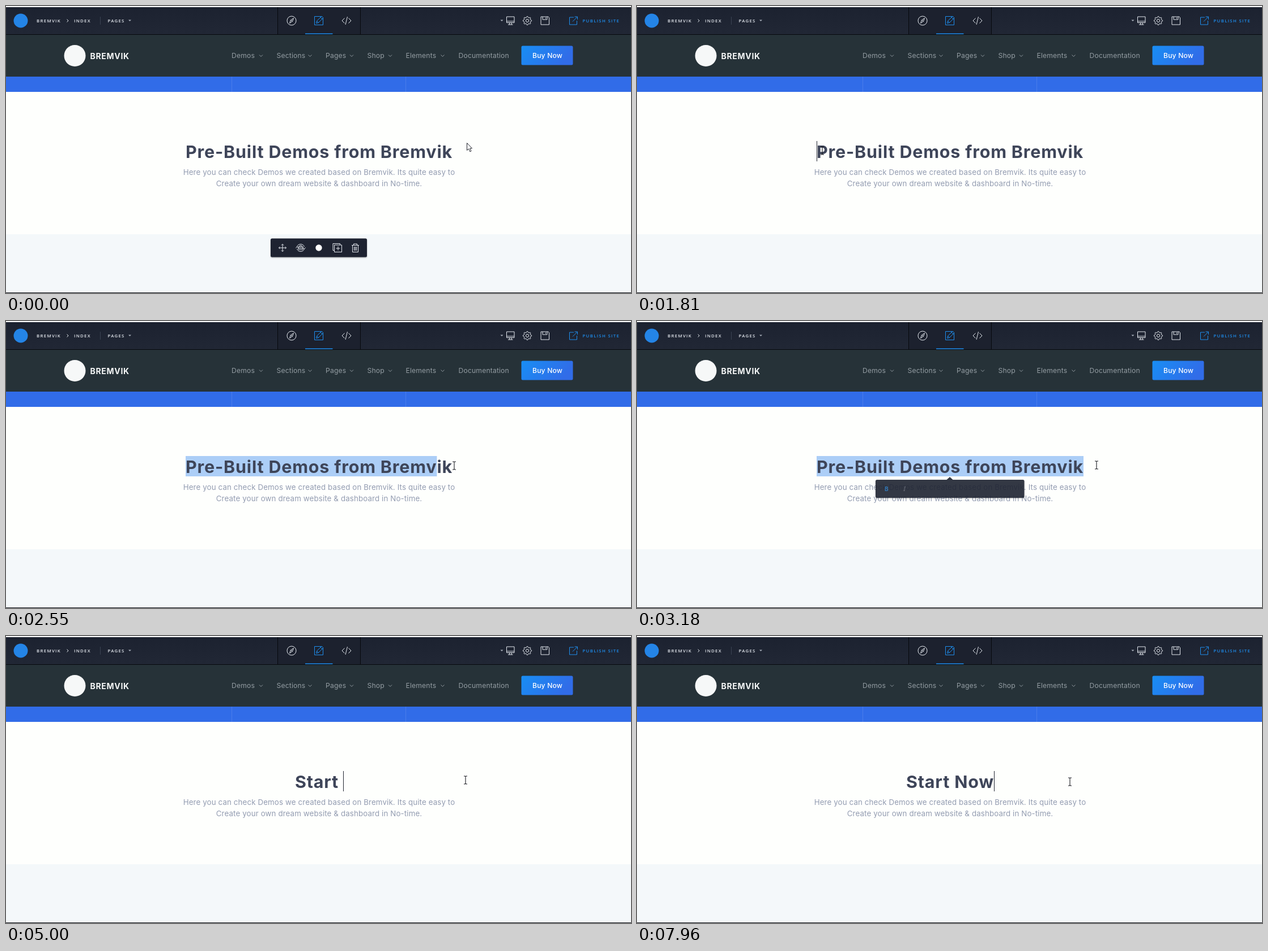
An HTML page for the animation above (8000 ms loop, 1103 by 508 pixels).

```html
<!DOCTYPE html>
<html lang="en">
<head>
<meta charset="utf-8">
<title>Site builder</title>
<style>
html, body { margin: 0; width: 100%; height: 100%; overflow: hidden; background: #fefffd; }
svg { display: block; width: 100vw; height: 100vh; }
text { font-family: Inter, "Open Sans", sans-serif; white-space: pre; }
.top text { font: 600 7.8px "Open Sans", sans-serif; letter-spacing: 1.3px; fill: #e4e8ee; }
.nav text { font-size: 12.2px; letter-spacing: .14px; fill: #939ca2; }
.copy text { font-size: 13.3px; letter-spacing: .13px; fill: #939cb1; text-anchor: middle; }
#title { font-size: 30.5px; font-weight: 700; letter-spacing: .8px; fill: #3e4559; text-anchor: middle; }
.line { fill: none; stroke: #e4e8ee; stroke-width: 1; stroke-linejoin: round; }
.blue { stroke: #1e8eee; }
.panel { fill: #1e2331; filter: drop-shadow(0 1px 1px rgba(0, 0, 0, .3)); }
</style>
</head>
<body>
<svg viewBox="0 0 1103 508" preserveAspectRatio="none">
  <defs>
    <linearGradient id="buy" x1="0" y1="0" x2="1" y2=".3">
      <stop offset="0" stop-color="#188ef4"/><stop offset="1" stop-color="#316ce8"/>
    </linearGradient>
    <linearGradient id="bar" x1="0" y1="0" x2="0" y2="1">
      <stop offset="0" stop-color="#1c2230"/><stop offset="1" stop-color="#212735"/>
    </linearGradient>
  </defs>

  <rect width="1103" height="508" fill="#fefffd"/>
  <rect y="2" width="1103" height="48" fill="url(#bar)"/>
  <rect y="50" width="1103" height="1" fill="#07090d"/>
  <rect y="51" width="1103" height="74" fill="#263238"/>
  <rect y="125" width="1103" height="27" fill="#316ce8"/>
  <path d="M398.500 125V152M705.500 125V152" stroke="#4a7deb"/>
  <rect y="404" width="1103" height="103" fill="#f4f8fa"/>
  <rect y="507" width="1103" height="1" fill="#15171c"/>

  <g class="top">
    <rect x="479" y="2" width="147" height="48" fill="#1c212e"/>
    <path d="M479.500 2V50M625.500 2V50" stroke="#07090d"/>
    <rect x="528" y="48.500" width="48.500" height="1.500" fill="#1e8eee"/>
    <circle cx="26" cy="26" r="12.500" fill="#2484e6"/>
    <text x="54" y="29">BREMVIK</text>
    <path class="line" d="M107.500 23.500l2.500 2.500-2.500 2.500"/>
    <text x="120" y="29">INDEX</text>
    <path d="M166.500 19V33" stroke="#3a4252"/>
    <text x="179.500" y="29">PAGES</text>
    <path d="M216 24.500h5l-2.500 2.500zM872.500 24.500h5l-2.500 2.500z" fill="#aab1bc"/>

    <circle class="line" cx="504" cy="26" r="8"/>
    <path class="line" d="M507.500 21.500l-2 5.500-5 3.500 2-5.500zM502.500 25l3 2"/>
    <path class="line blue" d="M557 18.500H544.500V33.500H559.500V22M547.500 30.500l1-4 8.500-8.500 3 3-8.500 8.500zM548.500 26.500l3 3M555 20l3 3"/>
    <path class="line" d="M597.500 21.500l-4.500 4.500 4.500 4.500M604.500 21.500l4.500 4.500-4.500 4.500M602.500 19l-3.500 14"/>

    <path class="line" d="M883.500 19h13.500v10.500h-13.500zM883.500 27h13.500M888.500 29.500v3.500M892 29.500v3.500M886 33h8.500"/>
    <path class="line" id="gear"/>
    <circle class="line" cx="920" cy="26" r="2.600"/>
    <path class="line" d="M944 19h13l1.500 1.500V33h-14.500zM947 19v5h8v-5M952.500 20.500v2"/>
    <path class="line blue" d="M1002 20H994.500V33H1007.500V26M1000 27.500L1008.500 19M1003.500 19H1008.500V24"/>
    <text x="1017.500" y="29" style="fill:#1e8eee">PUBLISH SITE</text>
  </g>

  <g class="nav" id="nav">
    <circle cx="121.500" cy="88" r="19" fill="#f6f8f8"/>
    <text x="148.500" y="93.500" style="font-size:14px;font-weight:700;letter-spacing:.7px;fill:#f6f8f8">BREMVIK</text>
    <rect x="909.500" y="70.500" width="91" height="34" rx="2.500" fill="url(#buy)"/>
    <text x="929" y="91.500" style="font-weight:500;fill:#fff">Buy Now</text>
  </g>

  <rect id="sel" y="239" height="36" fill="#accef7"/>
  <text id="title" x="552.500" y="268.500"></text>
  <rect id="caret" y="239" width="1" height="36" fill="#222631"/>
  <g class="copy">
    <text x="552.500" y="299">Here you can check Demos we created based on Bremvik. Its quite easy to</text>
    <text x="552.500" y="318.500">Create your own dream website &amp; dashboard in No-time.</text>
  </g>

  <g id="tools">
    <rect class="panel" x="467" y="411.500" width="170" height="33" rx="2.500"/>
    <path class="line" d="M481.500 428h13M488 421.500v13M483.500 426l-2 2 2 2M492.500 426l2 2-2 2M486 423.500l2-2 2 2M486 432.500l2 2 2-2"/>
    <path class="line" d="M513.500 426a7 7 0 0 1 13 0M526.500 430a7 7 0 0 1-13 0M511.500 428.500l2-2.500 2.500 2M528.500 427.500l-2 2.500-2.500-2M516 426h8v5h-8zM517.500 426l1-2h3l1 2M516 428.500h8"/>
    <circle cx="552" cy="428" r="5.700" fill="#fff"/>
    <path class="line" d="M579.500 432.500h-2.500V420.500h12.500v2.500M579.500 423h13v12.500h-13zM582.500 429h7M586 425.500v7"/>
    <path class="line" d="M610 423.500h13M613.500 423.500v-2.500h6v2.500M611.500 423.500v12h10v-12M614.500 426v7M616.500 426v7M618.500 426v7"/>
  </g>

  <g id="popup">
    <path d="M546.500 281l5.500-5 5.500 5z" fill="#1e2331"/>
    <rect class="panel" x="421" y="281" width="262.500" height="32" rx="2.500"/>
    <text id="bold" x="437" y="301" style="font-size:10px;font-weight:700;fill:#1e8eee">B</text>
    <text id="ital" x="470" y="301" style="font:italic 11px 'Noto Serif',serif;fill:#e4e8ee">I</text>
  </g>

  <g id="pointer">
    <path id="arrow" d="M.5.500V13.500l3-2.700 2.300 5 2.200-1-2.300-4.800H9.500z" fill="#fff" stroke="#23262e" stroke-linejoin="round"/>
    <path id="beam" d="M-3-7H-1L0-6 1-7H3M0-6V6M-3 7H-1L0 6 1 7H3" fill="none" stroke="#1b1d24" stroke-width="1.100"/>
  </g>
</svg>
<script>
const LOOP = 8000;
const HEADING = 'Pre-Built Demos from Bremvik';
const CENTER = 552.5;
const NBSP = '\u00a0';
const $ = id => document.getElementById(id);
const clamp = v => Math.max(0, Math.min(1, v));
const ramp = (t, from, to) => clamp((t - from) / (to - from));
const show = (el, on) => el.setAttribute('visibility', on ? 'visible' : 'hidden');

// time, x, y of the pointer
const path = [
  [290, 813, 242], [420, 770, 245], [620, 610, 250], [860, 410, 252],
  [1070, 333, 254], [1140, 281, 252], [1300, 281, 252], [1370, 323, 256],
  [1800, 323, 256], [1900, 360, 256], [2120, 545, 256], [2320, 695, 256],
  [2480, 768, 256], [2550, 791, 256], [2770, 811, 255], [7400, 811, 255],
  [7440, 817, 252], [7630, 817, 252], [7770, 812, 252], [7880, 812, 252],
  [7960, 764, 258]
];

// time and length of the new heading
const typed = 'Start Now';
const keys = [[3500, 1], [4000, 2], [4180, 3], [4330, 4], [4510, 5], [5000, 6], [5700, 7], [6220, 8], [6700, 9]];

function pointerAt(t) {
  const i = path.findIndex(p => p[0] > t);
  if (i === 0) return path[0].slice(1);
  if (i < 0) return path[path.length - 1].slice(1);
  const [a, b] = [path[i - 1], path[i]];
  const k = ramp(t, a[0], b[0]);
  return [1, 2].map(n => a[n] + (b[n] - a[n]) * k);
}

function headingAt(t) {
  const done = keys.filter(k => k[0] <= t);
  if (!done.length) return HEADING;
  return typed.slice(0, done[done.length - 1][1]).replace(/ /g, NBSP);
}

function edgeNear(x) {
  const start = title.getStartPositionOfChar(0).x;
  let best = start;
  for (let i = 0; i < HEADING.length; i++) {
    const edge = title.getEndPositionOfChar(i).x;
    if (Math.abs(edge - x) < Math.abs(best - x)) best = edge;
  }
  return [start, best];
}

const title = $('title');

function drawTitle(t) {
  const str = headingAt(t);
  if (title.textContent !== str) title.textContent = str;
  const selecting = t >= 1700 && t < keys[0][0];
  let width = 0, caretX;
  if (selecting) {
    const [start, end] = edgeNear(t < 1850 ? 0 : pointerAt(t - 90)[0]);
    width = end - start;
    caretX = start;
    $('sel').setAttribute('x', start);
  } else {
    caretX = CENTER + title.getComputedTextLength() / 2;
  }
  $('sel').setAttribute('width', width);
  $('caret').setAttribute('x', Math.round(caretX));
  const blinkOff = (t >= 5550 && t < 5700) || (t >= 7290 && t < 7770);
  show($('caret'), t >= 1700 && !width && !blinkOff);
}

function drawPopup(t) {
  const shown = ramp(t, 3050, 3195) * (1 - ramp(t, keys[0][0], 3700));
  $('popup').setAttribute('opacity', shown);
  $('popup').setAttribute('transform', `translate(0 ${5 * (1 - ramp(t, 3050, 3180))})`);
  $('bold').setAttribute('opacity', ramp(t, 3100, 3220));
  $('ital').setAttribute('opacity', ramp(t, 3140, 3270));
}

function drawPointer(t) {
  const [x, y] = pointerAt(t);
  const overText = x > 300 && x < 811.5;
  $('pointer').setAttribute('transform', `translate(${Math.round(x)} ${Math.round(y)})`);
  show($('beam'), overText);
  show($('arrow'), !overText);
}

function draw(t) {
  drawTitle(t);
  drawPopup(t);
  drawPointer(t);
  $('tools').setAttribute('opacity', 1 - ramp(t, 380, 620));
}

function buildNav() {
  const items = [['Demos', 398, 450], ['Sections', 477.5, 536.5], ['Pages', 564, 610],
    ['Shop', 637.5, 678], ['Elements', 705.5, 770.5], ['Documentation', 798.5]];
  $('nav').insertAdjacentHTML('beforeend', items.map(([label, x, arrow]) =>
    `<text x="${x}" y="91.500">${label}</text>` +
    (arrow ? `<path class="line" style="stroke:#939ca2" d="M${arrow - 3} 86.500l3 3 3-3"/>` : '')).join(''));
}

function buildGear() {
  const pts = [];
  for (let i = 0; i < 32; i++) {
    const a = (i - .5) * Math.PI / 16;
    const r = i % 4 < 2 ? 7.6 : 5.8;
    pts.push(`${(920 + r * Math.cos(a)).toFixed(2)} ${(26 + r * Math.sin(a)).toFixed(2)}`);
  }
  $('gear').setAttribute('d', `M${pts.join('L')}Z`);
}

buildNav();
buildGear();
const began = performance.now();
function frame() {
  draw((performance.now() - began) % LOOP);
  requestAnimationFrame(frame);
}
frame();
</script>
</body>
</html>
```
